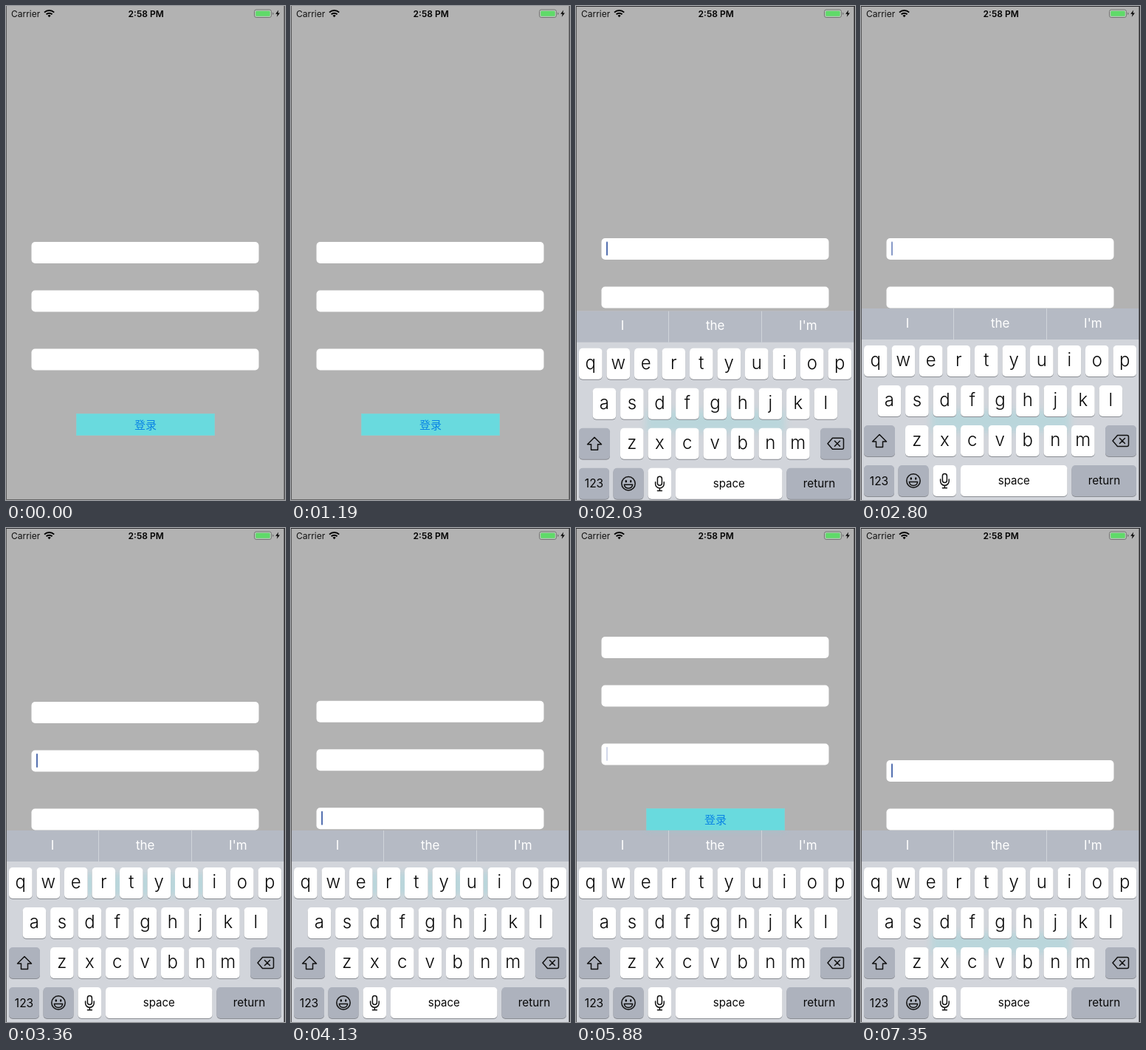
Recreate the animation shown at these times as an HTML page. Size 378x668 px, loop 7420 ms.

```html
<!DOCTYPE html>
<html lang="en">
<head>
<meta charset="utf-8">
<title>Login form and keyboard</title>
<style>
  html, body { margin: 0; width: 100%; height: 100%; overflow: hidden; background: #b2b2b2; }
  svg { position: absolute; left: 0; top: 0; width: 378px; height: 668px; display: block; }
  text { font-family: Inter, Roboto, sans-serif; }
  .cjk { font-family: "Noto Sans CJK SC", "Noto Sans CJK", "Noto Sans CJK JP", sans-serif; }
  .line { fill: none; stroke: #111; stroke-width: 1.5; stroke-linecap: round; stroke-linejoin: round; }
</style>
</head>
<body>
<svg id="stage" viewBox="0 0 378 668">
  <defs>
    <clipPath id="panel"><rect width="378" height="260"/></clipPath>
    <filter id="soft" x="-20%" y="-80%" width="140%" height="260%"><feGaussianBlur stdDeviation="5"/></filter>
  </defs>
  <rect width="378" height="668" fill="#b2b2b2"/>

  <text x="7" y="14.6" font-size="12" fill="#111">Carrier</text>
  <g fill="none" stroke="#000" stroke-width="2">
    <path d="M52 8.6a9.5 9.5 0 0 1 13.2 0"/>
    <path d="M54.6 11.3a5.8 5.8 0 0 1 8 0"/>
  </g>
  <path d="M58.6 15.2l-2.1-2.2a3 3 0 0 1 4.2 0z"/>
  <text x="189.7" y="14.6" font-size="12" font-weight="600" text-anchor="middle">2:58 PM</text>
  <rect x="336.5" y="5" width="23" height="10.5" rx="2.6" fill="#b9c4ba" stroke="#727572"/>
  <rect x="338.3" y="6.8" width="19.4" height="6.9" rx="1.2" fill="#5fda69"/>
  <path d="M361 8.6v3.4q1.5-.5 1.5-1.7t-1.5-1.7z" fill="#727572"/>
  <path d="M369.2 5.6l-4 5.2h2.6l-1 4 4.2-5.3h-2.7z"/>

  <g id="form"></g>
  <g id="keyboard"></g>

  <g id="edges" fill="#2b2b2e">
    <rect width="1" height="668" fill="#5a5a5c"/>
    <rect id="right" x="376.5" width="1.5" height="668"/>
    <rect id="bottom" y="667" width="378" height="1" fill="#666"/>
    <rect id="top" width="378" height="1"/>
  </g>
</svg>
<script>
const LOOP = 7420;
const KB_HEIGHT = 259;
const KB_START = 1670;
const FIELD_Y = [319, 384.5, 463.5];
const BUTTON_Y = 551;
// Each focus: start time, field index, form offset, move duration
const FOCUS = [
  { at: KB_START, field: 0, off: -5 },
  { at: 3105, field: 1, off: -84, dur: 245 },
  { at: 4115, field: 2, off: -172, dur: 225 },
  { at: 5890, field: 0, off: -5, dur: 205 }
];
const $ = id => document.getElementById(id);

function add(parent, tag, attrs, text) {
  const el = document.createElementNS("http://www.w3.org/2000/svg", tag);
  for (const k in attrs) el.setAttribute(k, attrs[k]);
  if (text) el.textContent = text;
  parent.appendChild(el);
  return el;
}

function label(parent, x, y, size, text, extra) {
  return add(parent, "text", { x, y, "font-size": size, "text-anchor": "middle", fill: "#080808", ...extra }, text);
}

function buildForm() {
  const form = $("form");
  for (const y of FIELD_Y)
    add(form, "rect", { x: 34.5, y, width: 308, height: 29, rx: 5, fill: "#fff" });
  add(form, "rect", { x: 95.5, y: BUTTON_Y + .5, width: 187, height: 29, fill: "#69dade", stroke: "#7fd2d4" });
  label(form, 189, BUTTON_Y + 20.7, 15, "登录", { fill: "#0a84e4", class: "cjk" });
  return add(form, "rect", { x: 41, width: 2, height: 19, rx: 1, fill: "#5470b0" });
}

function buildKeyboard() {
  const kb = $("keyboard");
  add(kb, "rect", { width: 378, height: 260, fill: "#d2d5db" });
  add(kb, "rect", { width: 378, height: 42, fill: "#b5bac4" });
  const behind = add(kb, "g", { "clip-path": "url(#panel)" });
  const glow = add(behind, "rect", { x: 95, width: 188, height: 30, fill: "#69dade", opacity: .22, filter: "url(#soft)" });
  for (const x of [125, 251])
    add(kb, "rect", { x, width: 1, height: 42, fill: "#d0d4da" });
  ["I", "the", "I'm"].forEach((w, i) => label(kb, 63 + i * 125.7, 25.6, 17, w, { fill: "#fff" }));

  const key = (x, y, w, fill = "#fff") => {
    add(kb, "rect", { x, y: y + 1, width: w, height: 42, rx: 5, fill: "#898c92" });
    add(kb, "rect", { x, y, width: w, height: 42, rx: 5, fill });
  };
  const GREY = "#adb2bd";
  [["qwertyuiop", 4, 50], ["asdfghjkl", 22.6, 104], ["zxcvbnm", 60, 158]].forEach(([letters, x0, y]) => {
    [...letters].forEach((c, i) => {
      const x = x0 + i * 37.5;
      key(x, y, 31.6);
      label(kb, x + 15.8, y + 28.3, 24, c, { "font-weight": 300 });
    });
  });
  key(4, 158, 42, GREY);
  key(331, 158, 42, GREY);
  key(4, 212, 41, GREY);
  key(50.5, 212, 41, GREY);
  key(97.5, 212, 31.5);
  key(135, 212, 144.5);
  key(285.5, 212, 87.5, GREY);
  label(kb, 24.5, 238.8, 15.5, "123");
  label(kb, 207.3, 238, 15, "space");
  label(kb, 329.5, 238, 15.3, "return");

  const icon = d => add(kb, "path", { d, class: "line" });
  // shift, backspace
  icon("M25 170.5l9.5 9.5h-5v7.5h-9v-7.5h-5z");
  icon("M347.5 171.5h13q2 0 2 2v11q0 2-2 2h-13l-6.5-7.5zM350.5 175.5l7 7m0-7l-7 7");
  // smiley
  add(kb, "circle", { cx: 71, cy: 233, r: 9.2, class: "line" });
  add(kb, "ellipse", { cx: 67.8, cy: 230, rx: 1.2, ry: 1.8 });
  add(kb, "ellipse", { cx: 74.2, cy: 230, rx: 1.2, ry: 1.8 });
  icon("M65.3 234.5h11.4q-.8 5-5.7 5t-5.7-5z");
  // microphone
  add(kb, "rect", { x: 110.4, y: 223.5, width: 6, height: 12, rx: 3, class: "line" });
  icon("M107.6 231v2.5a5.8 5.8 0 0 0 11.6 0v-2.5M113.4 239.4v3.4M110.4 242.8h6");
  return glow;
}

const clamp = v => Math.max(0, Math.min(1, v));
const smooth = u => u * u * (3 - 2 * u);

// Critically damped spring from 0 to 1
function spring(ms) {
  const x = Math.max(0, ms) * .01725;
  return 1 - (1 + x) * Math.exp(-x);
}

function formOffset(t) {
  let y = 0;
  for (const f of FOCUS) {
    const u = f.dur ? smooth(clamp((t - f.at) / f.dur)) : spring(t - f.at);
    y += (f.off - y) * u;
  }
  return y;
}

function caretAlpha(ms) {
  const p = ms % 1060;
  const fadeIn = ms < 1060 ? 1 : clamp(p / 100);
  return fadeIn * (1 - clamp((p - 560) / 200));
}

const caret = buildForm();
const glow = buildKeyboard();

function draw(t) {
  const off = formOffset(t);
  const top = 668 - KB_HEIGHT * spring(t - KB_START);
  $("form").setAttribute("transform", `translate(0 ${off.toFixed(2)})`);
  $("keyboard").setAttribute("transform", `translate(0 ${top.toFixed(2)})`);
  $("keyboard").setAttribute("visibility", t < KB_START ? "hidden" : "visible");
  glow.setAttribute("y", (BUTTON_Y + off - top).toFixed(2));

  const f = FOCUS.filter(s => t >= s.at).pop();
  caret.setAttribute("opacity", f ? caretAlpha(t - f.at).toFixed(3) : 0);
  if (f) caret.setAttribute("y", FIELD_Y[f.field] + 4.5);

  const open = t >= 1610;
  $("top").setAttribute("opacity", open ? 1 : 0);
  $("bottom").setAttribute("opacity", open ? 0 : 1);
  $("right").setAttribute("opacity", open ? 1 : .75);
}

const start = performance.now();
function tick() {
  draw((performance.now() - start) % LOOP);
  requestAnimationFrame(tick);
}
draw(0);
requestAnimationFrame(tick);
</script>
</body>
</html>
```
